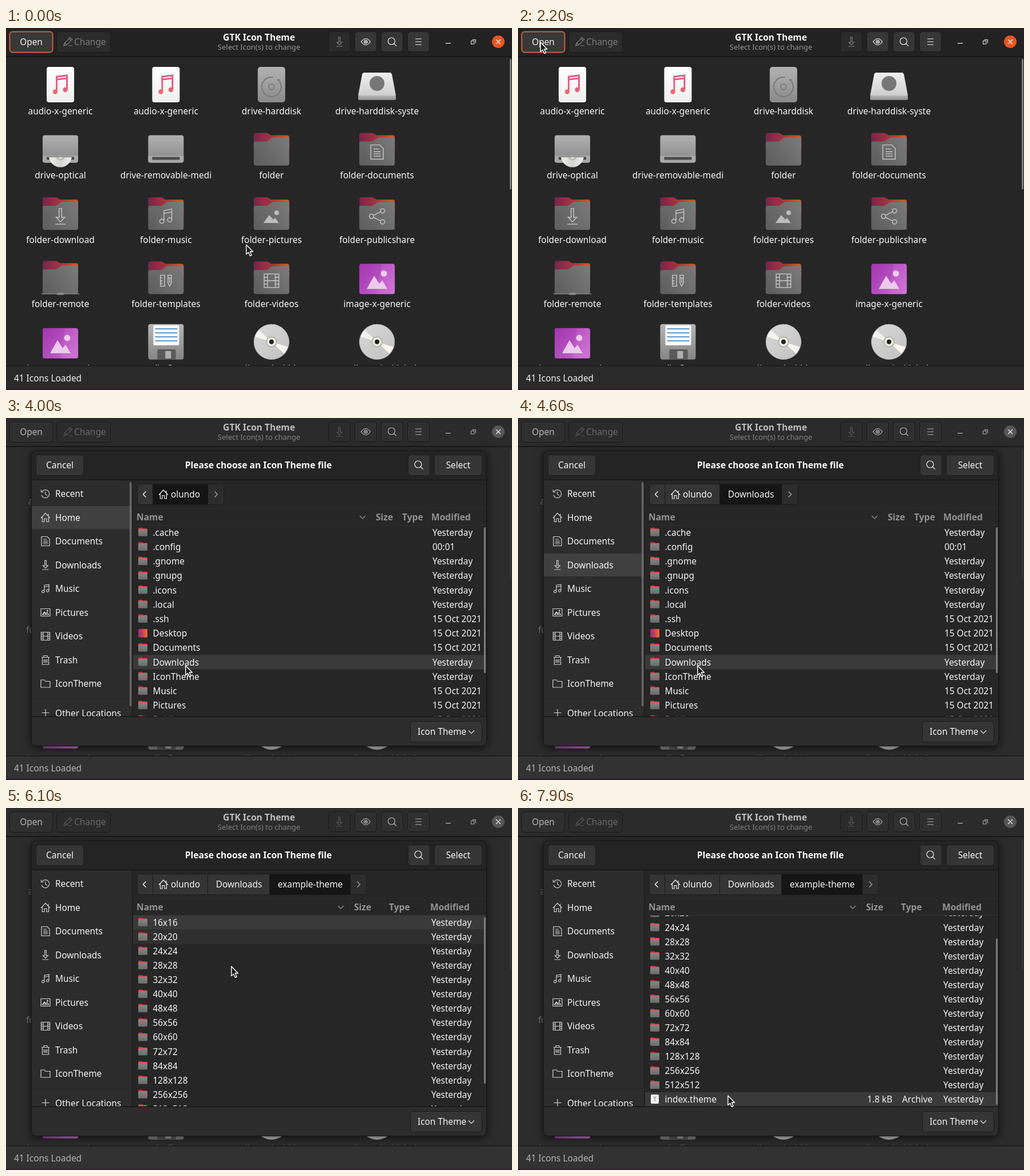
These frames come from a looping animation (884 px wide and 633 px high, 8000 ms). An HTML page with a canvas:

```html
<!DOCTYPE html>
<html lang="en">
<head>
<meta charset="utf-8">
<title>GTK Icon Theme</title>
<style>
html, body { margin: 0; width: 100%; height: 100%; overflow: hidden; background: #262626; }
canvas { display: block; }
</style>
</head>
<body>
<canvas id="stage" width="884" height="633"></canvas>
<script>
const ctx = document.getElementById('stage').getContext('2d');
const LOOP = 8000, STEP = 100;
const FONT = '"Noto Sans", "Open Sans", sans-serif';
const gray = v => `rgb(${v},${v},${v})`;
const mix = (a, b, k) => Math.round(a + (b - a) * k);

// ---------- drawing helpers ----------
function lin(x0, y0, x1, y1, ...cols) {
  const g = ctx.createLinearGradient(x0, y0, x1, y1);
  cols.forEach((c, i) => g.addColorStop(i / (cols.length - 1), c));
  return g;
}
function box(x, y, w, h, fill, r = 0, stroke, lw = 1) {
  ctx.beginPath();
  ctx.roundRect(x, y, w, h, r);
  if (fill) { ctx.fillStyle = fill; ctx.fill(); }
  if (stroke) { ctx.strokeStyle = stroke; ctx.lineWidth = lw; ctx.stroke(); }
}
function dot(x, y, r, fill, stroke, lw = 1) {
  ctx.beginPath();
  ctx.arc(x, y, r, 0, 7);
  if (fill) { ctx.fillStyle = fill; ctx.fill(); }
  if (stroke) { ctx.strokeStyle = stroke; ctx.lineWidth = lw; ctx.stroke(); }
}
function shape(d, fill, stroke, lw = 1) {
  const p = new Path2D(d);
  if (fill) { ctx.fillStyle = fill; ctx.fill(p); }
  if (stroke) { ctx.strokeStyle = stroke; ctx.lineWidth = lw; ctx.stroke(p); }
}
// y is the middle of the capitals
function text(s, x, y, col = '#f4f4f4', align = 'left', size = 15.4, weight = 400) {
  ctx.font = `${weight} ${size}px ${FONT}`;
  ctx.textAlign = align;
  ctx.fillStyle = col;
  ctx.fillText(s, x, y + size * 0.36);
}
function at(x, y, draw, scale = 1) {
  ctx.save();
  ctx.translate(x, y);
  ctx.scale(scale, scale);
  draw();
  ctx.restore();
}
function clipped(x, y, w, h, draw) {
  ctx.save();
  ctx.beginPath();
  ctx.rect(x, y, w, h);
  ctx.clip();
  draw();
  ctx.restore();
}

// ---------- symbolic glyphs, 16 px grid around 0,0 ----------
const ring = (x, y, r) => `M${x + r} ${y}a${r} ${r} 0 1 1 ${-2 * r} 0a${r} ${r} 0 1 1 ${2 * r} 0`;
const GLYPHS = {
  recent: 'M-6 -4A7 7 0 1 1 -7 2M-7.5 -7V-3H-3.5M0 -4V1L3 3',
  home: 'M-8 1L0 -7.5L8 1M-5.5 -1V7.5H-2V2H2V7.5H5.5V-1M5 -6.5V-3',
  doc: 'M-7 -8H3L7 -4V8H-7ZM-4 -3.5H2M-4 -.5H4M-4 2H4M-4 4.5H4',
  down: 'M-1.3 -8V1H-4.5L0 5.5L4.5 1H1.3V-8ZM-5.5 8H5.5',
  note: 'M-2 5V-6L6 -7.5V3.5M-2 -3L6 -4.5' + ring(-4.2, 5, 2.2) + ring(3.8, 3.5, 2.2),
  pic: 'M-8 -6.5H8V6.5H-8ZM-5.5 4L-2 -1L1 2L3 0L5.5 4ZM-4.5 3L-2 1L2 3' + ring(3.5, -3, 1),
  film: 'M-7.5 -7H7.5V7H-7.5ZM-4 -7V7M4 -7V7M-4 0H4M-7.5 -3.5H-4M-7.5 0H-4M-7.5 3.5H-4M4 -3.5H7.5M4 0H7.5M4 3.5H7.5',
  trash: 'M-7 -4.5H7M-3 -5V-7.5H3V-5M-5.5 -4V8H5.5V-4M-2.5 -1V5M0 -1V5M2.5 -1V5',
  folder: 'M-8 6.5V-6.5H-2L0 -4H8V6.5Z',
  plus: 'M-6.5 0H6.5M0 -6.5V6.5',
  search: 'M3.4 3.4L7.5 7.5' + ring(-1, -1, 6),
  eye: 'M-8 0Q0 -11 8 0Q0 11 -8 0Z' + ring(0, 0, 3) + ring(0, 0, 1),
  menu: 'M-5.5 -5H5.5M-5.5 0H5.5M-5.5 5H5.5',
  pencil: 'M-7 7L-5.5 2L4 -7.5L7.5 -4L-2 5.5ZM2 -5.5L5.5 -2M1 7H8M-5.5 2L-2 5.5',
  prev: 'M2.5 -5L-2.5 0L2.5 5',
  next: 'M-2.5 -5L2.5 0L-2.5 5',
  drop: 'M-5 -2.5L0 2.5L5 -2.5',
  close: 'M-4 -4L4 4M4 -4L-4 4',
  share: 'M-4 -1L4 -5M-4 1L4 5' + ring(-6, 0, 2.4) + ring(6, -6, 2.4) + ring(6, 6, 2.4),
  tools: 'M-8 -8H-2V8H-8ZM-8 -4H-5M-8 0H-5M-8 4H-5M3 -8H8V3L5.5 8L3 3ZM3 -4H8M5.5 -4V3'
};
function glyph(name, x, y, col = '#dcdcdc', scale = 1, lw = 1.2) {
  at(x, y, () => shape(GLYPHS[name], null, col, lw / scale), scale);
}

// ---------- large icons, drawn around 0,0 ----------
function folderBody() {
  shape('M-31 0V-24Q-31 -28 -27 -28H-9Q-6 -28 -4 -26L-1 -24H27Q31 -24 31 -20V0Z',
    lin(-31, 0, 31, 0, '#75264d', '#a8343f', '#e2551f'));
  shape('M-31 -10Q-31 -13 -28 -13H-10Q-7 -13 -5 -15L0 -18.5Q2 -20 5 -20H28Q31 -20 31 -17V25Q31 29 27 29H-27Q-31 29 -31 25Z',
    lin(-25, 25, 30, -18, '#5f5f5f', '#7a7a7a'));
}
const folder = (name, scale = 1.5) => () => {
  folderBody();
  if (name) glyph(name, 0, 5.5, '#bdbdbd', scale, 1.6);
};
function audio() {
  box(-24, -31, 48, 62, lin(0, -31, 0, 31, '#ffffff', '#efefef'), 4);
  const col = lin(-12, 14, 12, -16, '#f06a70', '#d0608a');
  shape('M-6.5 13V-14L11.5 -16V9M-6.5 -9L11.5 -11', null, col, 3);
  dot(-9, 12.5, 4.2, col);
  dot(8.5, 9, 4.2, col);
}
function disk() {
  box(-24, -31, 48, 62, lin(0, -31, 0, 31, '#b2b2b2', '#8a8a8a'), 5);
  ctx.beginPath();
  ctx.arc(0, 4, 17, -0.9, 4.9);
  ctx.strokeStyle = '#787878';
  ctx.lineWidth = 2;
  ctx.stroke();
  dot(0, 4, 5, null, '#787878', 2);
  dot(13, -8, 1.8, '#787878');
}
function systemDisk() {
  shape('M-22 -21H22Q25 -21 26 -18L33 19H-33L-26 -18Q-25 -21 -22 -21Z', lin(0, -22, 0, 19, '#f0f0f0', '#cfcfcf'));
  box(-33, 19, 66, 8, lin(0, 19, 0, 27, '#b6b6b6', '#8f8f8f'), 2);
  dot(0, -2, 13, '#777');
}
function slotDrive() {
  box(-31, -24, 62, 48, lin(0, -24, 0, 24, '#b0b0b0', '#898989'), 4);
  box(-31, 12, 62, 12, '#a9a9a9', [0, 0, 4, 4]);
  box(-24, 14, 48, 5, '#4c4c4c', 1);
}
function opticalDrive() {
  slotDrive();
  clipped(-31, 14.5, 62, 24, () => {
    dot(0, 12, 20, lin(-20, 0, 20, 0, '#f0f0ec', '#d2d2d2', '#f0f0ec'));
    dot(0, 12, 8, '#b8b8b0');
    dot(0, 12, 5, '#eee');
  });
}
function remote() {
  at(0, -1, folderBody);
  shape('M-33 28.5H33M0 25V29', null, '#7a7a7a', 2);
  box(-6, 27, 12, 3.5, '#8c8c8c', 1);
}
function pictures() {
  folderBody();
  shape('M-14 17L-4 3L3 11L6 8L13 17Z', '#bdbdbd');
  dot(9, -1, 4, '#bdbdbd');
}
function image() {
  box(-31, -24, 62, 53, lin(-31, -24, 31, 29, '#a235ae', '#b350bf', '#cc74d2'), 4);
  shape('M8 -24H27Q31 -24 31 -20V29H0Z', 'rgba(225,130,225,.22)');
  shape('M-18 20L-5 -3L4 11L9 5L18 20Z', '#edc9ee');
  dot(12, -7, 5.5, '#edc9ee');
}
function floppy() {
  box(-31, -31, 62, 62, lin(0, -31, 0, 31, '#b5b5b5', '#858585'), 4);
  box(-22, -29, 45, 35, '#fbfbfb', 2);
  for (let i = 0; i < 4; i++) box(-19, -23.5 + i * 7, 39, 1.6, '#3f8fc9');
  box(-15, 13, 32, 18, '#5a5a5a', [2, 2, 0, 0]);
  box(-1, 16, 10, 13, '#b0b0b0', 1);
}
function disc() {
  dot(0, 0, 31, lin(-20, -25, 20, 25, '#d6d6d6', '#c4c4c4'));
  shape('M0 0L-29 -9L-22 -21Z M0 0L29 9L22 21Z', '#f5f5ee');
  dot(0, 0, 30.5, null, '#b4b4b4');
  dot(0, 0, 10, '#bcbcae');
  dot(0, 0, 7.5, '#f0f0ea');
  dot(0, 0, 4, '#1f1f1f');
}
const ICONS = [
  ['audio-x-generic', audio], ['audio-x-generic', audio],
  ['drive-harddisk', disk], ['drive-harddisk-syste', systemDisk],
  ['drive-optical', opticalDrive], ['drive-removable-medi', slotDrive],
  ['folder', folder()], ['folder-documents', folder('doc', 1.55)],
  ['folder-download', folder('down', 1.7)], ['folder-music', folder('note', 1.7)],
  ['folder-pictures', pictures], ['folder-publicshare', folder('share', 1.6)],
  ['folder-remote', remote], ['folder-templates', folder('tools', 1.2)],
  ['folder-videos', folder('film', 1.7)], ['image-x-generic', image],
  ['image-x-generic', image], ['media-floppy', floppy],
  ['media-optical-bluray', disc], ['media-optical-label', disc]
];

// ---------- main window ----------
function button(x, y, w, h, fill, label, col) {
  box(x + .5, y + .5, w - 1, h - 1, fill, 5, '#1a1a1a');
  if (label) text(label, x + w / 2, y + h / 2, col, 'center');
}
function mainWindow(t) {
  const b = t < 2300 ? 0 : t < 2400 ? .5 : 1, head = t >= 3200 ? 1 : 0;
  box(0, 0, 884, 633, gray(mix(38, 44, b)));
  clipped(0, 51, 884, 539, () => ICONS.forEach(([name, draw], i) => {
    const x = 95 + (i % 4) * 184.4, y = 99 + Math.floor(i / 4) * 112.45;
    at(x, y, draw);
    text(name, x, y + 46.3, gray(mix(245, 125, b)), 'center');
  }));
  box(880, 54, 3, 228, head ? '#353535' : '#7c7c7c', 1.5);

  box(0, 0, 884, 49, gray(mix(34, 43, b)));
  box(0, 49, 884, 2, '#181818');
  const soft = gray(mix(240, 180, head)), dim = gray(mix(125, 85, b));
  button(6, 6, 76, 37, gray(t === 1900 ? 30 : mix(56, 47, b)), 'Open', soft);
  if (t < 2300) box(6.5, 6.5, 75, 36, null, 5, '#c0633f', 2);
  button(88, 6, 95, 37, gray(43));
  glyph('pencil', 108, 24, dim);
  text('Change', 119, 24, gray(mix(125, 105, b)));
  text('GTK Icon Theme', 442, 16.5, gray(mix(248, 190, head)), 'center', 15.6, 700);
  text('Select Icon(s) to change', 442, 33.5, gray(mix(150, 130, head)), 'center', 13);
  ['down', 'eye', 'search', 'menu'].forEach((g, i) => {
    button(563 + i * 46, 6, 39, 36, gray(i ? mix(54, 47, b) : 43));
    glyph(g, 582.5 + i * 46, 24, i ? soft : dim);
  });
  box(768, 26, 9, 1.2, soft);
  box(812.5, 22.5, 5.5, 5.5, null, 0, soft);
  shape('M814.5 20.5H820.5V26.5', null, soft);
  dot(860, 24, 11, head ? '#565656' : '#e95420');
  glyph('close', 860, 24, '#f4f4f4');

  box(0, 590, 884, 43, gray(mix(42, 50, b)));
  box(0, 590, 884, 1.5, '#181818');
  text('41 Icons Loaded', 14, 612, gray(mix(240, 180, b)));
  box(0, 631.5, 884, 1.5, '#2f1128');
}

// ---------- file chooser ----------
const PLACES = [
  ['Recent', 'recent'], ['Home', 'home'], ['Documents', 'doc'], ['Downloads', 'down'], ['Music', 'note'],
  ['Pictures', 'pic'], ['Videos', 'film'], ['Trash', 'trash'], ['IconTheme', 'folder']
];
const Y = 'Yesterday', OLD = '15 Oct 2021';
const VIEWS = [
  {
    pitch: 25.2, size: 646, type: 692, mod: 743, date: 745, bar: 255,
    rows: '.cache .config .gnome .gnupg .icons .local .ssh Desktop Documents Downloads IconTheme Music Pictures Public'.split(' '),
    dates: [Y, '00:01', Y, Y, Y, Y, OLD, OLD, OLD, Y, Y, OLD, OLD, OLD]
  },
  {
    pitch: 25.08, size: 644, type: 690, mod: 741, date: 743, bar: 291,
    rows: ['Aneva Win', 'example-theme', 'Mosaic Rebooted Win', 'natsu_icon_set_by_plumwoodgarden_d3fkxa7',
      'Seismic Rebuild System Win', 'Skyboats X win', 'Sun Drift Folders Win', 'Sky Feuds Minifigs Win',
      'Steamwork Storage Win', 'Taro Time Win', 'Plume Icon Theme', 'Tinkerframes X Vol 1 Win',
      'Tinkerframes X Vol 2 Win', 'TALON Villa Win'],
    dates: ['27 Nov 2007', Y, '7 Apr 2006', Y, '1 Dec 2008', '21 Jul 2009', '14 Apr 2009', '18 Apr 2006',
      '7 Dec 2010', '24 Oct 2007', Y, '24 Oct 2007', '24 Oct 2007', '27 Apr 2006']
  },
  {
    pitch: 25.08, size: 608, type: 669, mod: 741, date: 743, bar: 291,
    rows: [16, 20, 24, 28, 32, 40, 48, 56, 60, 72, 84, 128, 256, 512].map(n => n + 'x' + n).concat('index.theme'),
    dates: Array(15).fill(Y)
  }
];
const CRUMBS = [['olundo', 257, 353], ['Downloads', 353, 461], ['example-theme', 461, 602]];

function smallIcon(name, y) {
  if (name === 'Desktop') box(231, y - 8, 16, 15, lin(231, 0, 247, 0, '#8d2f86', '#c8414f', '#ee7433'), 2);
  else if (name === 'index.theme') {
    box(232, y - 9, 14, 16, '#f2f2f2', 2);
    box(236, y - 5, 6, 1.5, '#aaa');
    box(238, y - 5, 2, 8, '#aaa');
  } else {
    box(231, y - 8.5, 8, 8, '#a8303f', 1.5);
    box(231, y - 7, 16, 8, '#d8504a', 1.5);
    box(231, y - 5, 16, 11.5, lin(0, y - 5, 0, y + 7, '#858585', '#6a6a6a'), 1.5);
  }
}
function sidebar(t, place) {
  box(45, 109, 176, 413, '#2c2c2c');
  clipped(45, 109, 175, 413, () => {
    const hover = t >= 3200 && t < 3400 ? 2 : -1;
    PLACES.forEach(([name, g], i) => {
      const y = 132.5 + i * 41.5;
      if (i === place || i === hover) box(45, y - 20, 175, 40, i === place ? '#404040' : '#303030');
      glyph(g, 69, y, '#d0d0d0');
      text(name, 86, y);
    });
    box(45, 490, 175, 1, '#262626');
    glyph('plus', 69, 515.5, '#d0d0d0');
    text('Other Locations', 86, 516);
  });
  const a = t < 5400 ? .75 : t < 5500 ? .35 : 0;
  box(216, 112, 3.5, 392, `rgba(122,122,122,${a})`, 2);
  box(220, 109, 1.5, 413, '#1c1c1c');
}
function pathBar(n) {
  const end = CRUMBS[n][2];
  box(229.5, 115.5, end - 229 + 27, 36, '#343434', 5, '#1a1a1a');
  box(end, 116, 26, 35, '#2c2c2c', [0, 5, 5, 0]);
  for (let i = 0; i <= n; i++) {
    const [name, x0, x1] = CRUMBS[i];
    if (i === n) box(x0, 116, x1 - x0, 35, '#151515');
    else box(x1 - 1, 116, 1, 35, '#1a1a1a');
    if (i) text(name, (x0 + x1) / 2, 133.5, '#f4f4f4', 'center');
    else {
      glyph('home', 275, 133.5, '#f0f0f0');
      text(name, 288, 133.5);
    }
  }
  box(256, 116, 1, 35, '#1a1a1a');
  glyph('prev', 242, 133.5, '#e8e8e8', 1, 1.5);
  glyph('next', end + 14, 133.5, '#999', 1, 1.5);
}
function fileList(t, p) {
  const n = t < 4700 ? 0 : t < 5800 ? 1 : 2, v = VIEWS[n];
  const scroll = t >= 6400 ? 41.5 : 0;
  const chosen = n === 0 ? (t < 4000 ? 0 : 9) : n === 1 ? 0 : t < 6400 ? 0 : t < 7700 ? -1 : 14;
  let hover = p.x > 222 && p.y > 187 ? Math.floor((p.y - 187.5 + scroll) / v.pitch) : -1;
  if (t >= 3200 && t < 3400) hover = 4;
  if (t >= 5800 && t < 6400) hover = 1;

  clipped(222, 187, 617, 335, () => v.rows.forEach((name, i) => {
    const y = 200.3 + i * v.pitch - scroll;
    if (i === chosen || i === hover) box(222, y - 12.8, 617, v.pitch, i === chosen ? '#3a3a3a' : '#2f2f2f');
    smallIcon(name, y);
    text(name, 256.5, y);
    if (name === 'index.theme') {
      text('1.8 kB', 610, y);
      text('Archive', 671, y);
    }
    text(v.dates[i], v.date, y);
  }));
  const head = (s, x) => text(s, x, 173, '#939393', 'left', 15.6, 700);
  head('Name', 228);
  head('Size', v.size);
  head('Type', v.type);
  head('Modified', v.mod);
  glyph('drop', v.size - 23, 173.5, '#939393');
  [v.size, v.type, v.mod].forEach(x => box(x - 7.5, 160, 1, 27, '#2f2f2f'));
  box(222, 158, 617, 1, '#2b2b2b');
  box(222, 187, 617, 1, '#303030');
  if (t >= 3400) box(835, 191 + scroll * .89, 3, v.bar, '#7a7a7a', 1.5);
}
function dialog(t, p) {
  ctx.save();
  if (t < 2400) ctx.globalAlpha = .6;
  ctx.shadowColor = 'rgba(0,0,0,.65)';
  ctx.shadowBlur = 16;
  ctx.shadowOffsetY = 3;
  box(44, 57, 795.5, 517, '#262626', 8);
  ctx.shadowColor = 'transparent';
  box(45, 58, 794, 50, '#242424', [8, 8, 0, 0]);
  button(52, 64, 84, 37, '#353535', 'Cancel');
  text('Please choose an Icon Theme file', 441, 82.5, '#fafafa', 'center', 15.6, 700);
  button(702, 64, 39, 37, '#353535');
  glyph('search', 721, 82, '#eee');
  button(748, 64, 84, 37, '#353535', 'Select');
  box(45, 107.5, 794, 1.5, '#171717');

  const n = t < 4600 ? 0 : t < 5700 ? 1 : 2;
  sidebar(t, [1, 3, -1][n]);
  pathBar(n);
  fileList(t, p);

  box(45, 522, 794, 51, '#2c2c2c', [0, 0, 7, 7]);
  box(45, 521.5, 794, 1.5, '#171717');
  button(706, 530, 126, 37, '#353535');
  text('Icon Theme', 719, 548.5);
  glyph('drop', 813, 549, '#e8e8e8');
  box(44.5, 57.5, 795, 516, null, 8, '#141414');
  ctx.restore();
}

// ---------- pointer ----------
const TRACK = [
  [0, 419, 378], [900, 33, 22], [1100, 38.5, 24], [3100, 38.5, 24], [3200, 327, 363], [3300, 327, 363],
  [3400, 103, 385], [3500, 259, 396], [3600, 259, 396], [3700, 313, 432], [4900, 313, 432],
  [5200, 274, 221], [6000, 274, 221], [6100, 393, 276], [6300, 393, 276], [6400, 390, 303],
  [6500, 390, 303], [6800, 385, 354], [6900, 385, 354], [7200, 370, 480], [7300, 370, 480],
  [7400, 366, 502], [LOOP, 366, 502]
];
function pointer(t) {
  const i = TRACK.findIndex(k => k[0] > t);
  const [t0, x0, y0] = TRACK[i - 1], [t1, x1, y1] = TRACK[i];
  const k = (t - t0) / (t1 - t0), e = k * k * (3 - 2 * k);
  return { x: x0 + (x1 - x0) * e, y: y0 + (y1 - y0) * e };
}
function drawPointer({ x, y }) {
  at(x, y, () => {
    ctx.lineJoin = 'round';
    shape('M.8 1V17.5L4.6 14.2L7.4 20.5L10.2 19.2L7.4 13H12.4Z', '#1c1c1c', '#ffffff', 1.4);
  });
}

function render(t) {
  const p = pointer(t);
  mainWindow(t);
  if (t >= 2300) dialog(t, p);
  drawPointer(p);
}
const start = performance.now();
function tick() {
  const t = (performance.now() - start) % LOOP;
  render(Math.floor(t / STEP) * STEP);
  requestAnimationFrame(tick);
}
tick();
</script>
</body>
</html>
```
